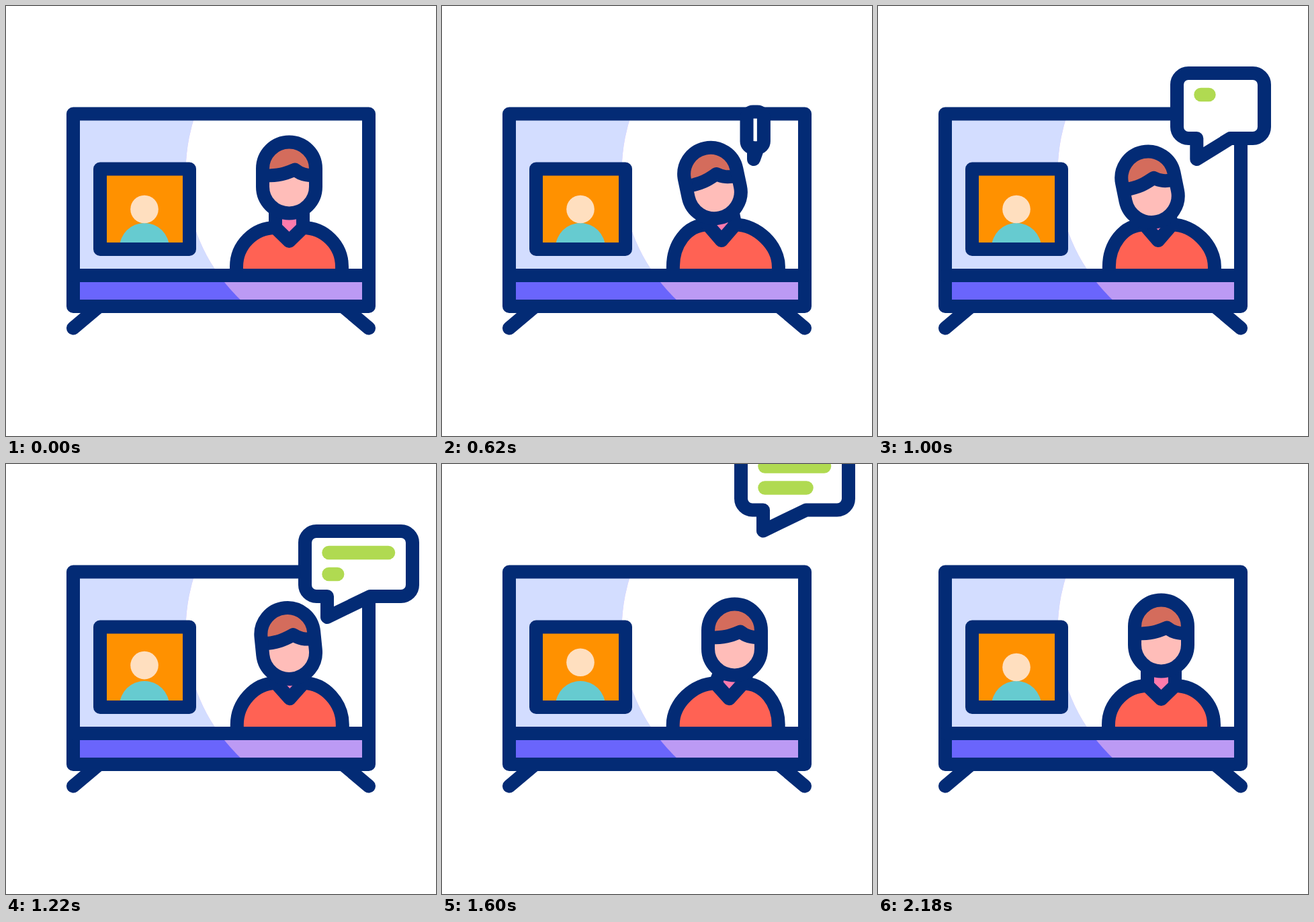
An HTML page that plays this animation: 640x640 px, repeating every 2520 ms.

```html
<!DOCTYPE html>
<html lang="en">
<head>
<meta charset="utf-8">
<title>Video call</title>
<style>
  html, body { margin: 0; width: 100%; height: 100%; overflow: hidden; background: #fff; }
  svg { display: block; width: 100%; height: 100%; }
  .ink { stroke: #032b75; stroke-width: 20; stroke-linecap: round; stroke-linejoin: round; }
  .open { fill: none; }
  .butt { stroke-linecap: butt; }
  .green { fill: none; stroke: #b0da51; stroke-width: 20.5; stroke-linecap: round; }
</style>
</head>
<body>
<svg viewBox="0 0 640 640">
  <defs>
    <clipPath id="screen"><rect x="100" y="160" width="440" height="241"/></clipPath>
    <clipPath id="photo"><rect x="140" y="242.5" width="133" height="110"/></clipPath>
    <clipPath id="skull"><rect x="-39.5" y="-53" width="79" height="106" rx="39.5"/></clipPath>
    <clipPath id="tv"><rect x="100" y="160" width="440" height="287"/></clipPath>
  </defs>

  <path class="ink open" d="M100 479.5L138 447.5M540 479.5L502 447.5"/>
  <g clip-path="url(#tv)">
    <rect x="100" y="160" width="440" height="241" fill="#d3ddff"/>
    <rect x="100" y="401" width="440" height="46" fill="#6a65fc"/>
    <circle cx="530.5" cy="247" r="263" fill="#bc9af4"/>
    <circle cx="530.5" cy="247" r="263" fill="#fff" clip-path="url(#screen)"/>
  </g>

  <rect x="140" y="242.5" width="133" height="119.5" fill="#ff9100"/>
  <g clip-path="url(#photo)">
    <circle cx="206" cy="360" r="37" fill="#66cbd0"/>
    <circle id="guest" cx="206" cy="302.5" r="20.8" fill="#ffdfbf"/>
  </g>
  <rect class="ink open" x="140" y="242.5" width="133" height="119.5"/>

  <g clip-path="url(#screen)">
    <path id="throat" fill="#ff7bac"/>
    <path id="body" class="ink" fill="#ff6254"/>
    <path id="neck" class="ink open"/>
  </g>
  <g id="head">
    <g clip-path="url(#skull)">
      <rect x="-40" y="-54" width="80" height="108" fill="#ffbdb9"/>
      <path d="M-40 -54H40V-3H-40Z" fill="#d46c5c"/>
      <path class="ink butt" fill="#d46c5c" d="M-40 -3C-13 -2.5 -5 -6.5 8.5 -12C16.5 -5.5 24 -3 40 -3"/>
    </g>
    <rect class="ink open" x="-39.5" y="-53" width="79" height="106" rx="39.5"/>
  </g>

  <rect class="ink open" x="100" y="160.5" width="440" height="286.5"/>
  <path class="ink open" d="M100 401H540"/>

  <g id="bubble">
    <path id="shell" class="ink" fill="#fff"/>
    <path id="line1" class="green"/>
    <path id="line2" class="green"/>
  </g>
</svg>
<script>
const LOOP = 2520;
const $ = id => document.getElementById(id);
const set = (id, name, value) => $(id).setAttribute(name, value);
const mix = (a, b, p) => a + (b - a) * p;
const ramp = (t, a, b) => Math.min(1, Math.max(0, (t - a) / (b - a)));
const smooth = p => p * p * (3 - 2 * p);

// time, head x, head y, tilt, shoulder x, shoulder y
const poses = [
  [0, 0, 0, 0, 0, 0],
  [140, 0, -3, 0, 0, 0],
  [440, -19, 12, -12, -5.5, -4.5],
  [620, -19, 8, -12, -5.5, -4.5],
  [1000, -17, 13.7, -11.5, -4.5, -4.5],
  [1100, -17, 12, -11.5, -4.5, -4.5],
  [1340, 14, 11, 0, 6, -3.5],
  [1440, 14, 11.5, 0, 6, -3.5],
  [1600, 14, 6, 0, 6, -3.5],
  [1900, 12.5, 12.5, 0, 4.5, -3.5],
  [1930, 12.5, 12.5, 0, 4.5, -3.5],
  [2170, 0, 0, 0, 0, 0],
  [LOOP, 0, 0, 0, 0, 0]
];

function poseAt(t) {
  const i = poses.findIndex(k => k[0] > t);
  const a = poses[i - 1], b = poses[i];
  const p = smooth(ramp(t, a[0], b[0]));
  return a.slice(1).map((v, j) => mix(v, b[j + 1], p));
}

function drawPerson(t) {
  const [dx, dy, tilt, sx, sy] = poseAt(t);
  const hx = 421.5 + dx, hy = 255.5 + dy;
  set('head', 'transform', `translate(${hx} ${hy}) rotate(${tilt})`);

  const c = Math.cos(tilt * Math.PI / 180), s = Math.sin(tilt * Math.PI / 180);
  const jaw = x => `${hx + x * c - 45 * s} ${hy + x * s + 45 * c}`;
  const l = 401 + sx, r = 442 + sx, y = 330 + sy;
  const left = `${l} ${y}`, right = `${r} ${y}`;
  const tip = `${421.5 + sx} ${350 + sy * 0.2}`;
  const base = sy * -0.2;
  const x0 = 343 + base, x1 = 500 + base;

  set('throat', 'd', `M${jaw(-20.5)}L${left}L${tip}L${right}L${jaw(20.5)}Z`);
  set('neck', 'd', `M${jaw(-20.5)}L${left}M${jaw(20.5)}L${right}`);
  set('body', 'd', `M${x0} 401V388C${x0} 356 ${l - 32} ${y} ${left}L${tip}L${right}` +
    `C${r + 32} ${y} ${x1} 356 ${x1} 388V401Z`);
}

function drawLine(id, y, length, p) {
  set(id, 'd', p > 0 ? `M480.5 ${y}h${Math.max(0.01, length * p)}` : '');
}

function drawBubble(t) {
  const shown = t >= 540 && t < 1680;
  set('bubble', 'visibility', shown ? 'visible' : 'hidden');
  if (!shown) return;

  // grows out of the tail tip, then widens, then flies off
  const grow = ramp(t, 540, 687), wide = ramp(t, 780, 1080);
  const fromTip = x => mix(464, x, grow);
  const L = fromTip(445), R = fromTip(mix(491, 605, wide));
  const T = mix(228, 100, grow), B = mix(228, 197, grow);
  const tail = mix(464, 478, wide), join = fromTip(mix(475, 542, wide));
  const q = 17 * grow;
  const turn = (x, y) => `a${q} ${q} 0 0 1 ${x * q} ${y * q}`;
  set('shell', 'd', `M${L + q} ${T}H${R - q}${turn(1, 1)}V${B - q}${turn(-1, 1)}` +
    `H${join}L${tail} 228V${B}H${L + q}${turn(-1, -1)}V${T + q}${turn(1, -1)}Z`);

  drawLine('line1', 132, 88.5, ramp(t, 970, 1200));
  drawLine('line2', 164, 62, ramp(t, 1180, 1380));
  set('bubble', 'transform', `translate(0 ${-240 * ramp(t, 1440, 1660) ** 2})`);
}

function drawGuest(t) {
  const lift = smooth(ramp(t, 1100, 1380)) - smooth(ramp(t, 1780, 2190));
  set('guest', 'cy', 302.5 - 7.3 * lift);
}

const start = performance.now();
function frame(now) {
  const t = Math.max(0, now - start) % LOOP;
  drawPerson(t);
  drawBubble(t);
  drawGuest(t);
  requestAnimationFrame(frame);
}
frame(start);
</script>
</body>
</html>
```
